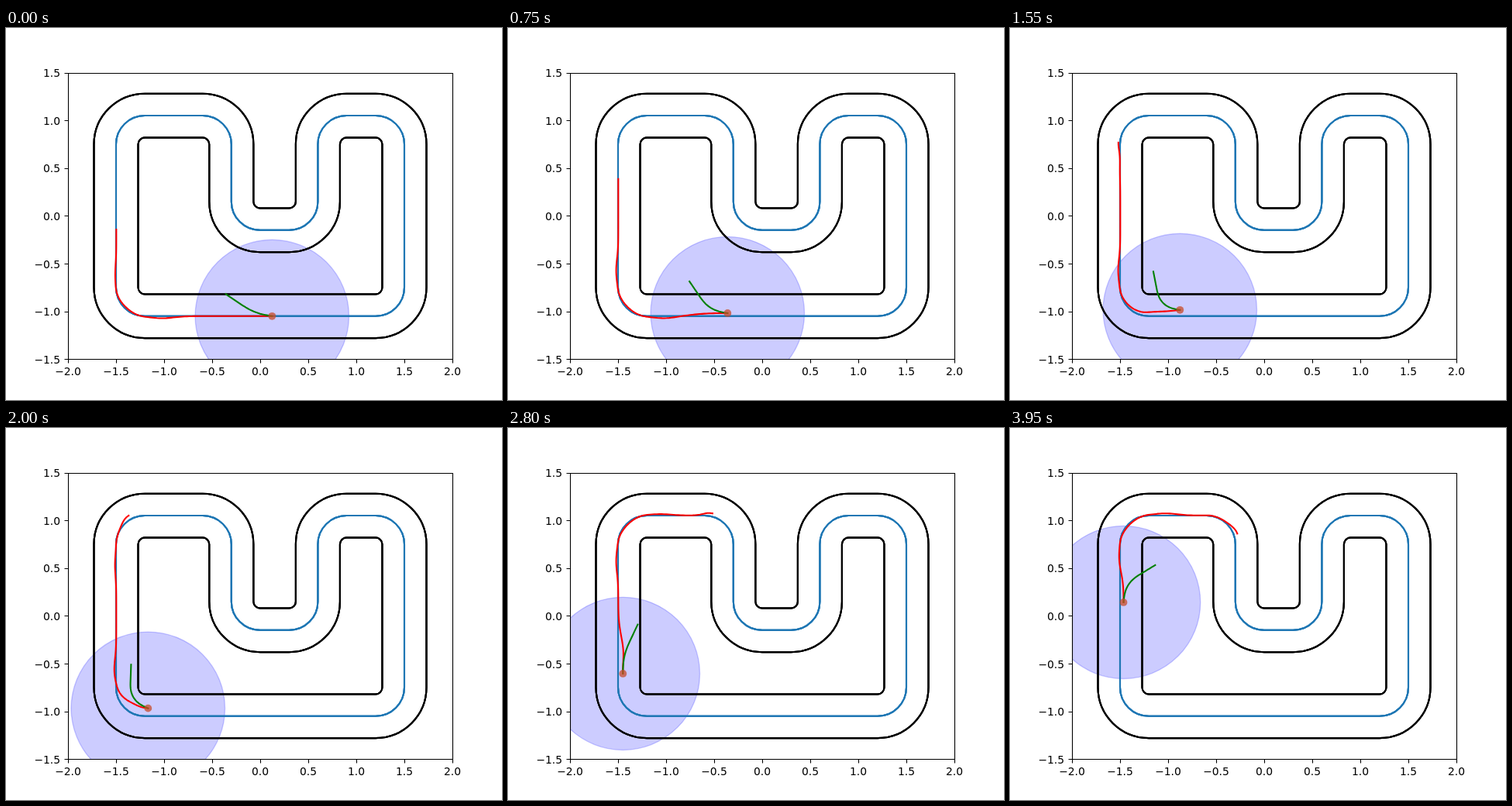
Write an HTML page with a canvas that moves like this. It is 640x480 px and loops after 4 s.

```html
<!DOCTYPE html>
<html lang="en">
<head>
<meta charset="utf-8">
<title>Track planner</title>
<style>
html, body { margin: 0; width: 100%; height: 100%; overflow: hidden; background: #fff; }
canvas { display: block; }
</style>
</head>
<body>
<canvas id="stage" width="640" height="480"></canvas>
<script>
const ctx = document.getElementById('stage').getContext('2d');
const LOOP = 4000, STEP = 50, LINE = 2.08, RAD = Math.PI / 180;
const px = x => 328 + 124 * x;
const py = y => 242.4 - 123.2 * y;
const bump = (d, width) => Math.exp(-((d / width) ** 2));
const smooth = u => {
  u = Math.max(0, Math.min(1, u));
  return u * u * (3 - 2 * u);
};

// Corners of the centre line, clockwise
const corners = [
  [-1.5, -1.05], [-1.5, 1.05], [-.3, 1.05], [-.3, -.15],
  [.6, -.15], [.6, 1.05], [1.5, 1.05], [1.5, -1.05]
];
// Distances along the centre line, in pixels, to the middle of each bend ahead
const bends = [193, 436, 569];

// Pixel position at a distance along the centre line, pushed outward
function road(s, out) {
  const r = 37, arc = r * Math.PI / 2;
  let x = 343.3, y = 371.8, h = Math.PI;
  for (const len of [164, 185, 75]) {
    const run = Math.min(s, len);
    x += Math.cos(h) * run;
    y += Math.sin(h) * run;
    s -= run;
    const bend = Math.min(s, arc), end = h + bend / r;
    x += r * (Math.sin(end) - Math.sin(h));
    y += r * (Math.cos(h) - Math.cos(end));
    h = end;
    s -= bend;
    if (s <= 0) break;
  }
  return [x + Math.sin(h) * out, y - Math.cos(h) * out];
}

// Distance and offset of the car: steady speed, cutting the first bend
function carAt(t) {
  const s = .08 * t + 16 * smooth((t - 2000) / 800);
  return [s, s < 160 ? -.0645 * s : -4.2 - 9.7 * bump(s - 188, 40)];
}

// Reach of the long plan: it slows down in bends
function horizonAt(t) {
  const keys = [[0, 297], [1150, 397], [1650, 412], [2000, 446], [2800, 549], [3950, 586]];
  const i = keys.findIndex(k => k[0] >= t) || 1;
  const [t0, a] = keys[i - 1], [t1, b] = keys[i];
  return a + (b - a) * (t - t0) / (t1 - t0);
}

// Drift out before and after a bend, in at its middle
function swing(s) {
  return bends.slice(0, 2).reduce((sum, mid) => {
    const d = Math.abs(s - mid);
    return sum + 2.7 * bump(d - 51, 22) - 1.6 * bump(d, 20);
  }, 0);
}

function longPlan(t) {
  const [s0, out] = carAt(t), s1 = horizonAt(t), n = 100, points = [];
  const base = s => swing(s) * smooth((s1 - s) / 110);
  const startFix = out - base(s0);
  const endFix = 6 * (bump(s1 - bends[1], 29) + bump(s1 - bends[2], 29));
  for (let i = 0; i <= n; i++) {
    const s = s0 + (s1 - s0) * i / n;
    const fade = Math.exp(-(((s - s0) / 52) ** 3));
    points.push(road(s, base(s) + startFix * fade + endFix * bump(s1 - s, 14)));
  }
  return points;
}

// Leaves along the car's heading and turns towards the inside
function shortPlan(t) {
  let [x, y] = road(...carAt(t));
  const [nx, ny] = road(...carAt(t + 150));
  const from = Math.atan2(y - ny, x - nx) + 6 * RAD, to = (34 + .029 * t) * RAD;
  const points = [[x, y]], n = 30, step = 67 / n;
  for (let i = 0; i < n; i++) {
    const h = from + (to - from) * smooth(1.5 * i / n);
    x -= Math.cos(h) * step;
    y -= Math.sin(h) * step;
    points.push([x, y]);
  }
  return points;
}

function stroke(color, width = LINE) {
  ctx.strokeStyle = color;
  ctx.lineWidth = width;
  ctx.stroke();
}

function polyline(points, color) {
  ctx.beginPath();
  points.forEach(p => ctx.lineTo(...p));
  stroke(color);
}

// Rounded loop at distance d outside the centre line
function track(d, color) {
  const n = corners.length;
  const at = corners.map(([x, y], i) => {
    const [ax, ay] = corners[(i + n - 1) % n], [bx, by] = corners[(i + 1) % n];
    const inX = Math.sign(x - ax), inY = Math.sign(y - ay);
    const outX = Math.sign(bx - x), outY = Math.sign(by - y);
    const turn = inY * outX - inX * outY;
    return [x - d * (inY + outY), y + d * (inX + outX), .3 + turn * d];
  });
  ctx.save();
  ctx.transform(124, 0, 0, -123.2, 328, 242.4);
  ctx.beginPath();
  ctx.moveTo(0, -1.05 - d);
  at.forEach(([x, y, r], i) => {
    const next = at[(i + 1) % n];
    ctx.arcTo(x, y, next[0], next[1], r);
  });
  ctx.closePath();
  ctx.restore();
  // Several laps lie on top of each other
  for (let lap = 0; lap < 3; lap++) stroke(color);
}

function axes() {
  const label = v => v.toFixed(1).replace('-', '\u2212');
  const snap = v => Math.round(v) + .5;
  ctx.font = '13.89px "DejaVu Sans", sans-serif';
  ctx.fillStyle = '#000';
  ctx.lineCap = 'butt';
  ctx.beginPath();
  ctx.rect(80.5, 58.5, 496, 369);
  ctx.textAlign = 'center';
  for (let v = -2; v <= 2; v += .5) {
    const x = snap(px(v));
    ctx.moveTo(x, 427.5);
    ctx.lineTo(x, 432.5);
    ctx.fillText(label(v), px(v), 448);
  }
  ctx.textAlign = 'right';
  for (let v = -1.5; v <= 1.5; v += .5) {
    const y = snap(py(v));
    ctx.moveTo(75.5, y);
    ctx.lineTo(80.5, y);
    ctx.fillText(label(v), 70.1, Math.round(py(v) + 5.5));
  }
  stroke('#000', 1.1);
}

function draw(t) {
  const [x, y] = road(...carAt(t));
  ctx.fillStyle = '#fff';
  ctx.fillRect(0, 0, 640, 480);
  ctx.save();
  ctx.beginPath();
  ctx.rect(80, 57.6, 496, 369.6);
  ctx.clip();
  ctx.lineJoin = 'round';
  ctx.lineCap = 'square';

  ctx.beginPath();
  ctx.ellipse(x, y, 99.2, 98.56, 0, 0, 7);
  ctx.fillStyle = 'rgba(0,0,255,.2)';
  ctx.fill();
  stroke('rgba(0,0,255,.2)', 1.39);

  track(0, '#1f77b4');
  track(.23, '#000');
  track(-.23, '#000');
  polyline(longPlan(t), '#f00');
  polyline(shortPlan(t), '#008000');

  ctx.beginPath();
  ctx.arc(x, y, 4.9, 0, 7);
  ctx.fillStyle = 'rgba(200,75,40,.75)';
  ctx.fill();
  ctx.restore();
  axes();
}

const start = performance.now();
function tick() {
  const t = (performance.now() - start) % LOOP;
  draw(Math.floor(t / STEP) * STEP);
  requestAnimationFrame(tick);
}
tick();
</script>
</body>
</html>
```
